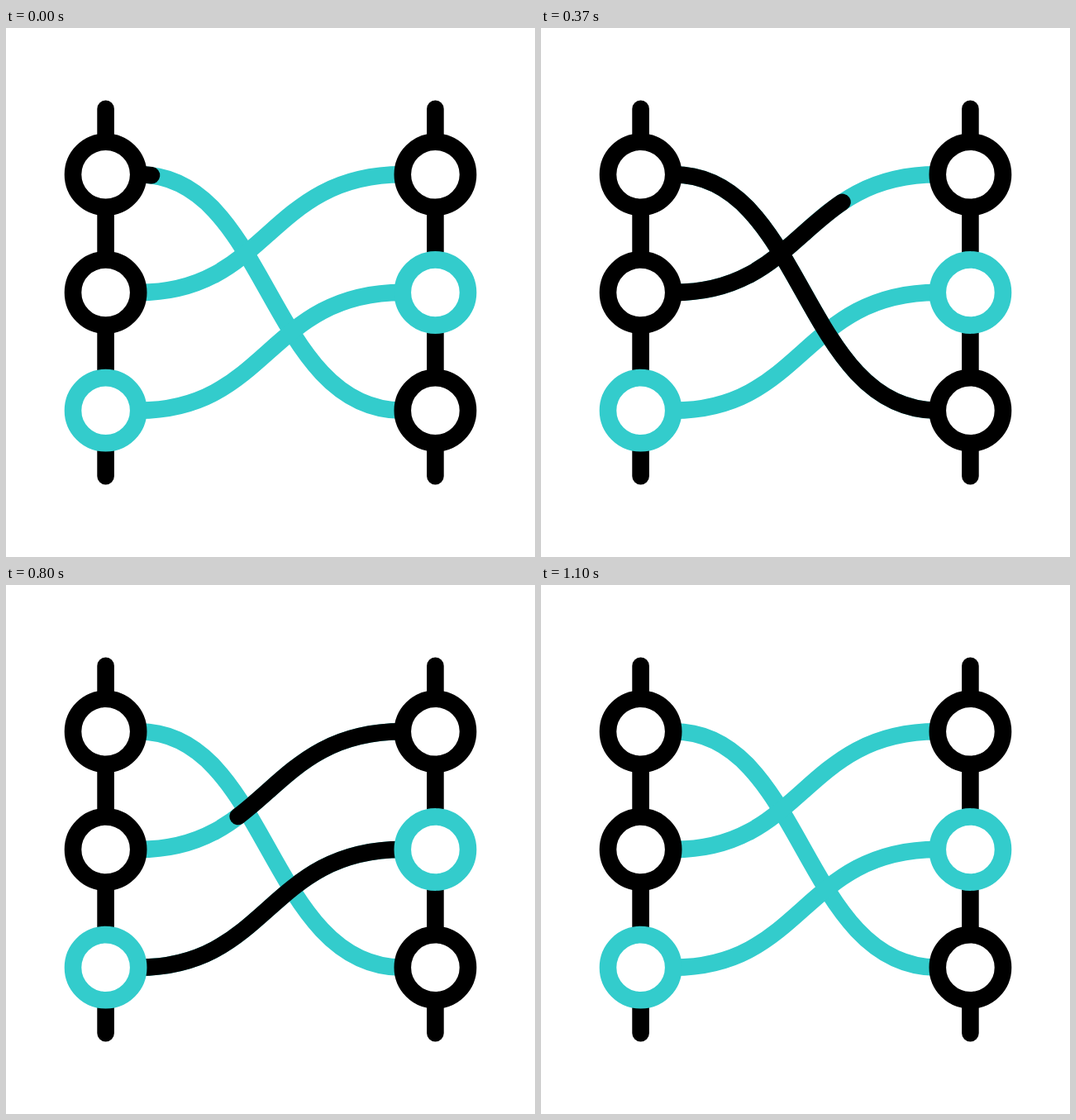
Recreate the animation shown at these times as an HTML page. Size 640 by 640 pixels, loop 1.67 s.

```html
<!DOCTYPE html>
<html lang="en">
<head>
<meta charset="utf-8">
<title>Crossing links</title>
<style>
  html, body { margin: 0; width: 100%; height: 100%; overflow: hidden; background: #fff; }
  svg { display: block; width: 100%; height: 100%; }
  g { fill: none; stroke: #000; stroke-width: 20.6; stroke-linecap: round; }
  #base { stroke: #33cccc; }
  #rings { fill: #fff; }
  .teal { stroke: #33cccc; }
</style>
</head>
<body>
<svg viewBox="0 0 640 640">
  <g id="base"></g>
  <g><path d="M120.6 97.8V542.2M519.4 97.8V542.2"/></g>
  <g id="ink"></g>
  <g id="rings"></g>
</svg>
<script>
const LOOP = 1670;
const ROWS = [177.3, 320, 462.7];
const LINKS = [[0, 2], [1, 0], [2, 1]]; // left row, right row

function add(id, tag, attrs) {
  const el = document.createElementNS('http://www.w3.org/2000/svg', tag);
  for (const key in attrs) el.setAttribute(key, attrs[key]);
  return document.getElementById(id).appendChild(el);
}

let total = 0;
const strands = LINKS.map(([from, to]) => {
  const a = ROWS[from], b = ROWS[to];
  const d = `M160.5 ${a}C317 ${a} 317 ${b} 479.5 ${b}`;
  add('base', 'path', { d });
  const el = add('ink', 'path', { d });
  const length = el.getTotalLength();
  const offset = total;
  total += length;
  return { el, length, offset };
});

ROWS.forEach((cy, row) => {
  add('rings', 'circle', { cx: 120.6, cy, r: 39.6, class: row === 2 ? 'teal' : '' });
  add('rings', 'circle', { cx: 519.4, cy, r: 39.6, class: row === 1 ? 'teal' : '' });
});

// One ink stroke runs through the three strands in turn, then is wiped the same way.
function draw(now) {
  const step = Math.floor(Math.floor(now % LOOP / 10) * 0.3 + 0.15); // 30 steps per second
  const head = 15.5 + 61.27 * step;
  const tail = 41.5 + 67.4 * (step - 16);
  for (const { el, length, offset } of strands) {
    const start = Math.max(0, tail - offset);
    const shown = Math.min(length, head - offset) - start;
    el.style.display = shown > 0 ? '' : 'none';
    el.setAttribute('stroke-dasharray', `${Math.max(shown, 0)} 2000`);
    el.setAttribute('stroke-dashoffset', -start);
  }
}

const origin = performance.now();
function tick() {
  draw(performance.now() - origin);
  requestAnimationFrame(tick);
}
tick();
</script>
</body>
</html>
```
